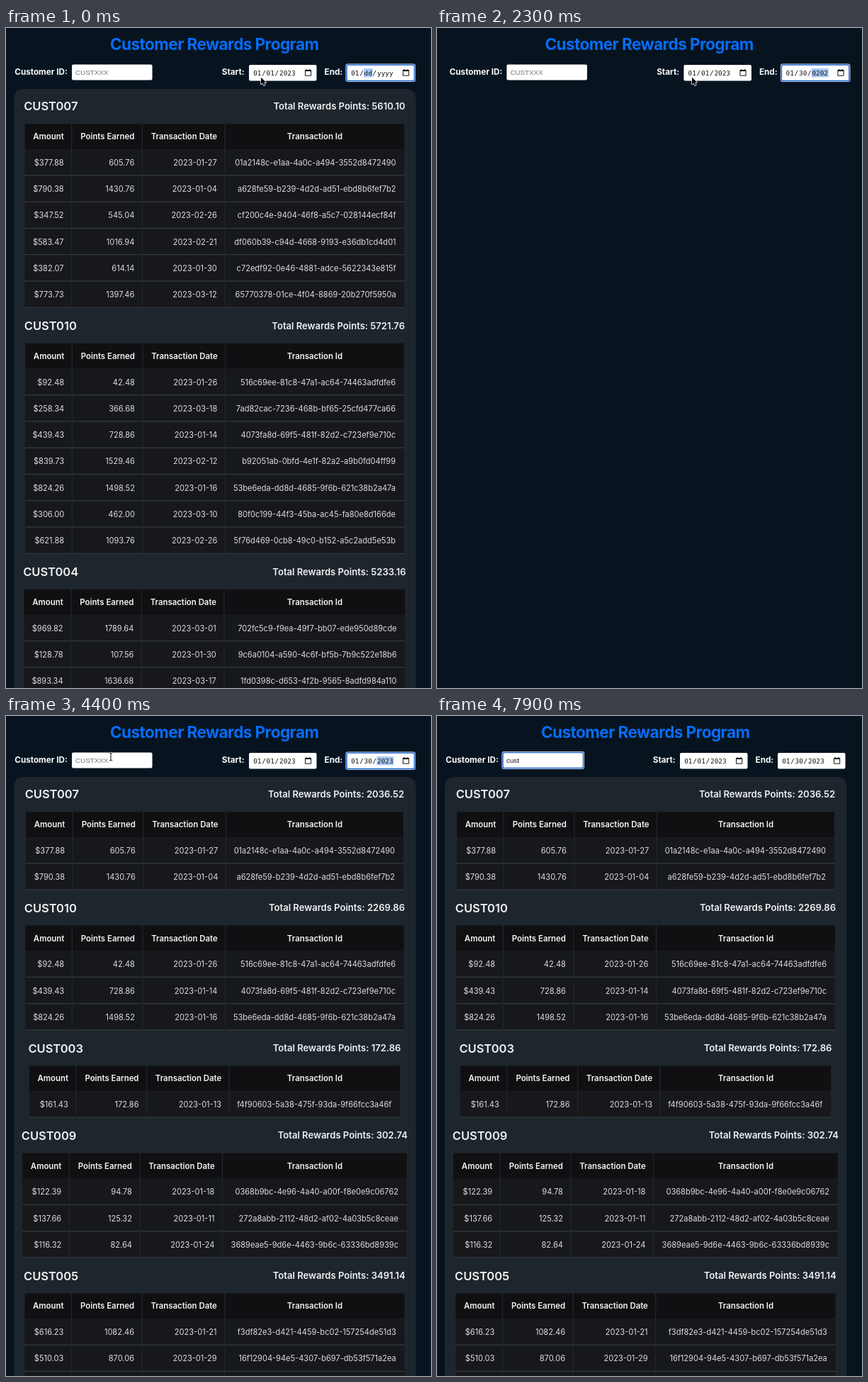
Animation of 600 by 931 pixels, one loop 8 s. Source, as an HTML page:

```html
<!DOCTYPE html>
<html lang="en">
<head>
<meta charset="utf-8">
<title>Customer Rewards Program</title>
<style>
  html, body { margin: 0; width: 100%; height: 100%; overflow: hidden; background: #071420; }
  svg { display: block; width: 100vw; height: 100vh; }
  text { font-family: Inter, Roboto, "Liberation Sans", sans-serif; white-space: pre; }
  .title { font-size: 22.5px; font-weight: 700; letter-spacing: -.55px; fill: #086cf7; text-anchor: middle; }
  .label { font-size: 11.7px; font-weight: 700; fill: #fafafa; }
  .name { font-size: 16.5px; font-weight: 600; fill: #f0f1f2; }
  .total { font-size: 13.05px; font-weight: 600; fill: #f0f1f2; text-anchor: end; }
  .th { font-size: 11.4px; font-weight: 600; fill: #f4f4f4; text-anchor: middle; }
  .td { font-size: 11.05px; fill: #dcdddf; text-anchor: end; }
  .input { font: 9.8px "Liberation Sans", Arial, sans-serif; fill: #111; }
  .hint { fill: #757575; }
  .date { font: 9.4px "DejaVu Sans Mono", monospace; fill: #111; }
  .item { font-size: 9px; fill: #f2f2f2; text-anchor: middle; }
</style>
</head>
<body>
<svg id="stage" viewBox="0 0 600 931" preserveAspectRatio="none"></svg>
<script>
const LOOP = 8000, ROW = 37.3, CUTOFF = '2023-01-30';

// name, left edge with all rows, left edge when filtered, then "amount date id"
const customers = [
  ['CUST007', 26.6, 28.1, [
    '377.88 2023-01-27 01a2148c-e1aa-4a0c-a494-3552d8472490',
    '790.38 2023-01-04 a628fe59-b239-4d2d-ad51-ebd8b6fef7b2',
    '347.52 2023-02-26 cf200c4e-9404-46f8-a5c7-028144ecf84f',
    '583.47 2023-02-21 df060b39-c94d-4668-9193-e36db1cd4d01',
    '382.07 2023-01-30 c72edf92-0e46-4881-adce-5622343e815f',
    '773.73 2023-03-12 65770378-01ce-4f04-8869-20b270f5950a']],
  ['CUST010', 27.2, 27.2, [
    '92.48 2023-01-26 516c69ee-81c8-47a1-ac64-74463adfdfe6',
    '258.34 2023-03-18 7ad82cac-7236-468b-bf65-25cfd477ca66',
    '439.43 2023-01-14 4073fa8d-69f5-481f-82d2-c723ef9e710c',
    '839.73 2023-02-12 b92051ab-0bfd-4e1f-82a2-a9b0fd04ff99',
    '824.26 2023-01-16 53be6eda-dd8d-4685-9f6b-621c38b2a47a',
    '306.00 2023-03-10 80f0c199-44f3-45ba-ac45-fa80e8d166de',
    '621.88 2023-02-26 5f76d469-0cb8-49c0-b152-a5c2add5e53b']],
  ['CUST004', 25.6, 25.6, [
    '969.82 2023-03-01 702fc5c9-f9ea-49f7-bb07-ede950d89cde',
    '128.78 2023-01-30 9c6a0104-a590-4c6f-bf5b-7b9c522e18b6',
    '893.34 2023-03-17 1fd0398c-d653-4f2b-9565-8adfd984a110',
    '924.64 2023-02-08 3b81c07e-52da-4e19-8c46-d07f5a29be63']],
  ['CUST003', 32.8, 32.8, [
    '161.43 2023-01-13 f4f90603-5a38-475f-93da-9f66fcc3a46f']],
  ['CUST009', 23.2, 23.2, [
    '122.39 2023-01-18 0368b9bc-4e96-4a40-a00f-f8e0e9c06762',
    '137.66 2023-01-11 272a8abb-2112-48d2-af02-4a03b5c8ceae',
    '116.32 2023-01-24 3689eae5-9d6e-4463-9b6c-63336bd8939c']],
  ['CUST005', 26.4, 26.4, [
    '616.23 2023-01-21 f3df82e3-d421-4459-bc02-157254de51d3',
    '510.03 2023-01-29 16f12904-94e5-4307-b697-db53f571a2ea',
    '844.31 2023-01-06 8e05d7b2-61fc-4d93-a7e8-c2490f13b56d']]
];

const stage = document.getElementById('stage');

function add(parent, tag, attrs, content) {
  const el = document.createElementNS('http://www.w3.org/2000/svg', tag);
  for (const k in attrs) el.setAttribute(k, attrs[k]);
  if (content !== undefined) el.textContent = content;
  parent.appendChild(el);
  return el;
}
const group = parent => add(parent, 'g', {});
const text = (parent, cls, x, y, s) => add(parent, 'text', { class: cls, x, y }, s);
const rect = (parent, x, y, width, height, fill, rx = 0) =>
  add(parent, 'rect', { x, y, width, height, fill, rx });
const path = (parent, d, attrs) => add(parent, 'path', { d, ...attrs });
const show = (el, on) => el.setAttribute('visibility', on ? 'visible' : 'hidden');

const points = a => a > 100 ? 2 * (a - 100) + 50 : a - 50;

function drawTable(g, name, left, rows, y) {
  const right = 589 - left;
  const edges = [left, left + 66.8, left + 166.5, left + 283, right];
  const top = y + 24.8;
  const total = rows.reduce((sum, r) => sum + points(+r[0]), 0);
  text(g, 'name', left - 1.4, y + 6, name);
  text(g, 'total', right + 1.2, y + 4.6, 'Total Rewards Points: ' + total.toFixed(2));
  ['Amount', 'Points Earned', 'Transaction Date', 'Transaction Id'].forEach((head, i) => {
    const x = edges[i], w = edges[i + 1] - x - (i < 3 ? 1.4 : 0);
    rect(g, x, top, w, 36, '#101012');
    text(g, 'th', (x + edges[i + 1]) / 2, y + 46.7, head);
    rows.forEach((r, n) => {
      const mid = y + 79.5 + n * ROW;
      const cells = ['$' + r[0], points(+r[0]).toFixed(2), r[1], r[2]];
      rect(g, x, mid - 18.4, w, 36, '#17181b');
      rect(g, x, mid + 17.5, w, 1, '#3a3d41');
      text(g, 'td', edges[i + 1] - 11.8, mid + 4, cells[i]);
    });
  });
}

function drawList(filtered) {
  const g = group(stage);
  rect(g, 11, 86, 567.5, 900, '#1e262d', 13);
  let y = 110.3;
  for (const [name, all, some, lines] of customers) {
    let rows = lines.map(s => s.split(' '));
    if (filtered) rows = rows.filter(r => r[1] < CUTOFF);
    if (!rows.length) continue;
    drawTable(g, name, filtered ? some : all, rows, y);
    y += 123.2 + ROW * (rows.length - 1);
  }
  return g;
}

function drawBox(g, x, y, width, height) {
  rect(g, x, y, width, height, '#fff', 2);
  const ring = group(g);
  rect(ring, x - 1.5, y - 1.5, width + 3, height + 3, '#f2f6fc', 3.2);
  rect(ring, x - .8, y - .8, width + 1.6, height + 1.6, '#1a5fc8', 2.6);
  rect(ring, x + .7, y + .7, width - 1.4, height - 1.4, '#fff', 1.4);
  return ring;
}

function drawDate(g, x) {
  const ring = drawBox(g, x, 52, 95.5, 22.5);
  const mark = rect(g, 0, 57, 0, 12.5, '#a8cbf9');
  const put = (dx, s) => text(g, 'date', x + dx, 66.7, s);
  put(6.2, '01'); put(18.2, '/'); put(36.6, '/');
  const day = put(24.6, '01'), year = put(43, '2023');
  const cx = x + 79.5;
  path(g, `M${cx} 59.6h8.2v7.6h-8.2z`, { fill: 'none', stroke: '#111', 'stroke-width': 1 });
  path(g, `M${cx} 60.4h8.2M${cx + 1.7} 58.2v1.5M${cx + 6.5} 58.2v1.5`, { stroke: '#111', 'stroke-width': 1.4 });
  return { ring, day, year, mark };
}

const fullList = drawList(false), shortList = drawList(true);

const head = group(stage);
text(head, 'title', 294.2, 31.3, 'Customer Rewards Program');
text(head, 'label', 12.3, 65.8, 'Customer ID:');
text(head, 'label', 304.8, 66.4, 'Start:');
text(head, 'label', 449.6, 66.4, 'End:');
const idRing = drawBox(head, 93, 51.5, 113.5, 22);
const hint = text(head, 'input hint', 98, 65.7, 'CUSTXXX');
const value = text(head, 'input', 98, 65.7, '');
const caret = rect(head, 98, 56.8, .9, 11.5, '#111');
show(drawDate(head, 343).ring, false);
const end = drawDate(head, 481);

const menu = group(stage);
path(menu, 'M143.5 81l5-4.5 5 4.5z', { fill: '#262729' });
rect(menu, 134.5, 80.5, 33.5, 80.5, '#262729', 3);
['c', 'A', 'y'].forEach((s, i) => text(menu, 'item', 145.5, 98.8 + i * 25.2, s));

const arrow = path(stage, 'M0 0v9.8l2.3-2.1 1.6 3.6 1.8-.8-1.6-3.5h3.1z',
  { fill: '#000', stroke: '#fff', 'stroke-width': 1.4, 'stroke-linejoin': 'round', 'paint-order': 'stroke' });
const beam = group(stage);
for (const [stroke, w] of [['#fff', 2], ['#111', 1]])
  path(beam, 'M-2.2-5.5q2.2 0 2.2 1.5v8q0 1.5-2.2 1.5M2.2-5.5q-2.2 0-2.2 1.5M0 4q0 1.5 2.2 1.5',
    { fill: 'none', stroke, 'stroke-width': w });

// latest entry of [time, value] reached at t
const at = (steps, t) => steps.filter(s => s[0] <= t).pop();
const days = [[0, 'dd'], [600, '03'], [1100, '30']];
const years = [[0, 'yyyy'], [1500, '0002'], [1900, '0020'], [2200, '0202'], [2500, '2023']];
const typed = [[0, ''], [6300, 'c'], [6700, 'cu'], [7000, 'cus'], [7300, 'cust']];
const CLICK = 4600, MOVE = 3700, ARRIVE = 4350;

function draw(t) {
  const empty = t >= 1500 && t < 2500, focus = t >= CLICK;
  show(fullList, t < 1500);
  show(shortList, t >= 2500);
  head.setAttribute('transform', `translate(${empty ? 5.4 : 0} 0)`);

  end.day.textContent = at(days, t)[1];
  end.year.textContent = at(years, t)[1];
  const onDay = t < 1100;
  end.mark.setAttribute('x', onDay ? 505 : 523.4);
  end.mark.setAttribute('width', onDay ? 12.6 : 24);
  show(end.mark, !focus);
  show(end.ring, !focus);
  show(idRing, focus);

  const [since, str] = at(typed, t);
  value.textContent = str;
  show(hint, !str);
  caret.setAttribute('x', 98 + (str ? value.getComputedTextLength() : 0));
  show(caret, focus && Math.floor((t - Math.max(since, CLICK)) / 500) % 2 === 0);
  show(menu, t >= 4800 && !str);

  const p = Math.min(1, Math.max(0, (t - MOVE) / (ARRIVE - MOVE)));
  const e = p * p * (3 - 2 * p);
  const x = 360 - 212 * e, y = 69.8 - 12.3 * e, over = x < 206;
  for (const c of [arrow, beam]) c.setAttribute('transform', `translate(${x} ${y})`);
  show(arrow, !over);
  show(beam, over && !str);
}

const start = performance.now();
function tick() {
  draw((performance.now() - start) % LOOP);
  requestAnimationFrame(tick);
}
tick();
</script>
</body>
</html>
```
